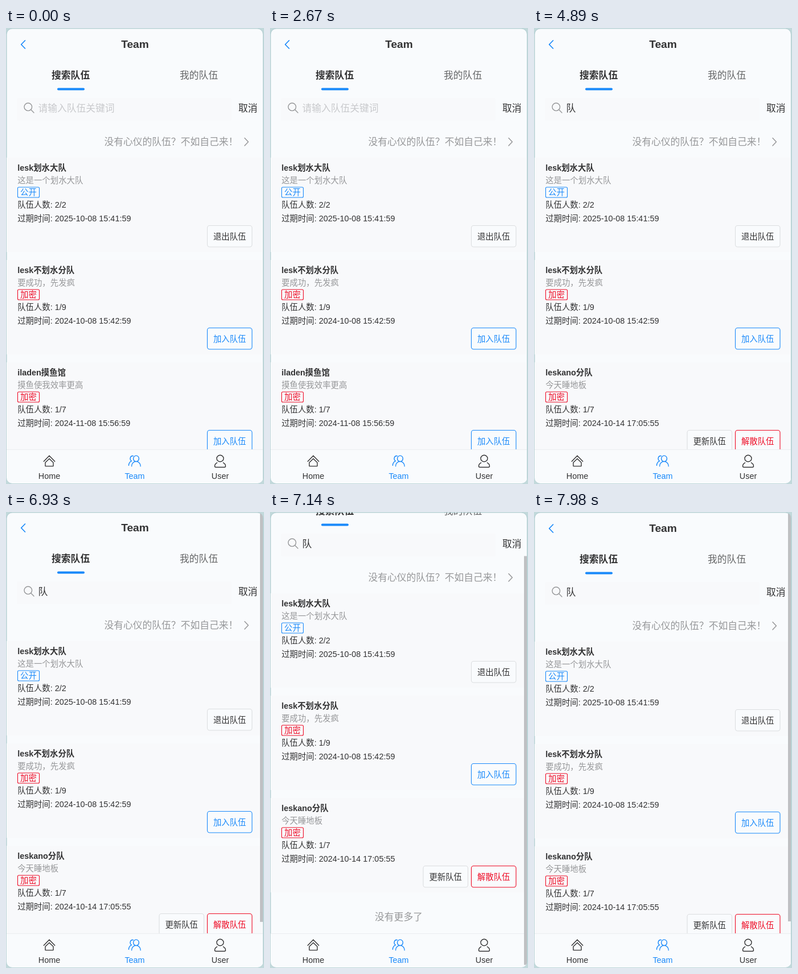
Recreate the animation shown at these times as an HTML page with a canvas. Size 453 by 802 pixels, loop 8 s.

```html
<!DOCTYPE html>
<html lang="zh-CN">
<head>
<meta charset="utf-8">
<title>Team</title>
<style>
html, body { margin: 0; width: 100%; height: 100%; overflow: hidden; background: #c2d9db; }
canvas { display: block; width: 453px; height: 802px; }
</style>
</head>
<body>
<canvas id="stage" lang="zh-CN"></canvas>
<script>
const W = 453, H = 802, LOOP = 8000, STEP = 30, MAX_SCROLL = 86;
const BLUE = '#1989fa', RED = '#ee0a24', DARK = '#323233', GREY = '#969799';
const PAGE = '#f9fbfd', PANEL = '#f8f9fb', LINE = '#dcdee0';
const FAMILY = '"Liberation Sans", "Noto Sans CJK SC", "Noto Sans CJK", sans-serif';

const canvas = document.getElementById('stage');
const dpr = window.devicePixelRatio || 1;
canvas.width = W * dpr;
canvas.height = H * dpr;
const ctx = canvas.getContext('2d');
ctx.lineCap = ctx.lineJoin = 'round';

const join = [['加入队伍', BLUE]];
const teams = [
  { name: 'lesk划水大队', about: '这是一个划水大队', open: true, count: '2/2',
    until: '2025-10-08 15:41:59', buttons: [['退出队伍', DARK]] },
  { name: 'lesk不划水分队', about: '要成功，先发疯', count: '1/9',
    until: '2024-10-08 15:42:59', buttons: join }
];
const allTeams = [...teams, { name: 'iladen摸鱼馆', about: '摸鱼使我效率更高', count: '1/7',
  until: '2024-11-08 15:56:59', buttons: join }];
const foundTeams = [...teams, { name: 'leskano分队', about: '今天睡地板', count: '1/7',
  until: '2024-10-14 17:05:55', buttons: [['解散队伍', RED], ['更新队伍', DARK]] }];

function text(str, x, y, size, color, bold, align = 'left') {
  ctx.font = `${bold ? 'bold ' : ''}${size}px ${FAMILY}`;
  ctx.textAlign = align;
  ctx.fillStyle = color;
  ctx.fillText(str, x, y);
}

function rect(x, y, w, h, color) {
  ctx.fillStyle = color;
  ctx.fillRect(x, y, w, h);
}

function round(x, y, w, h, r, fill, stroke) {
  ctx.beginPath();
  ctx.roundRect(x, y, w, h, r);
  if (fill) { ctx.fillStyle = fill; ctx.fill(); }
  if (stroke) { ctx.strokeStyle = stroke; ctx.lineWidth = 1.1; ctx.stroke(); }
}

function stroke(d, color, width) {
  ctx.strokeStyle = color;
  ctx.lineWidth = width;
  ctx.stroke(new Path2D(d));
}

// Standard ease-in-out, cubic-bezier(.42, 0, .58, 1)
function ease(p) {
  if (p <= 0) return 0;
  if (p >= 1) return 1;
  let lo = 0, hi = 1;
  for (let i = 0; i < 24; i++) {
    const s = (lo + hi) / 2, q = 1 - s;
    const x = 1.26 * q * q * s + 1.74 * q * s * s + s * s * s;
    if (x < p) lo = s; else hi = s;
  }
  return lo * lo * (3 - 2 * lo);
}

function scrollAt(t) {
  const down = ease((t - 6908) / 255), up = ease((t - 7422) / 268);
  return Math.round(MAX_SCROLL * (down - up));
}

function typedAt(t) {
  if (t < 3090) return '';
  if (t < 3210) return 'd';
  if (t < 3510) return 'du';
  return t < 4260 ? 'dui' : '队';
}

function caretAt(t) {
  return (t >= 1200 && t < 1710) || (t >= 2190 && t < 2670) || (t >= 3090 && t < 4740);
}

function drawHeader() {
  stroke('M33.5 22 L26.7 29 L33.5 36', BLUE, 1.7);
  text('Team', 226.5, 35, 19.2, DARK, true, 'center');
  text('搜索队伍', 113.6, 88.6, 16.8, DARK, true, 'center');
  text('我的队伍', 338.6, 88.6, 16.8, '#646566', false, 'center');
  round(90, 105.6, 48, 3.8, 1.9, BLUE);
}

function drawSearch(t) {
  round(19, 123, 377, 40, 2, PANEL);
  stroke('M45.6 138.8 a6.8 6.8 0 1 1 -13.6 0 a6.8 6.8 0 1 1 13.6 0 M43.8 143.8 L49 149', GREY, 1.4);
  const typed = typedAt(t);
  if (typed) text(typed, 56.4, 147.4, 16.8, DARK);
  else text('请输入队伍关键词', 56.4, 147.4, 16.8, '#c8c9cc');
  const width = typed ? ctx.measureText(typed).width : 0;
  if (typed && t < 4260) rect(56.4, 150, width, 1, DARK);
  if (caretAt(t)) rect(Math.round(56.4 + width), 131, 1, 20, DARK);
  text('取消', 408, 147.4, 16.8, DARK);
}

function drawInvite() {
  text('没有心仪的队伍？不如自己来！', 172.4, 206.4, 16.8, GREY);
  stroke('M419 193.5 L425.4 200.3 L419 207', GREY, 1.5);
}

function drawCard(team, y) {
  rect(1, y, 450, 166, PANEL);
  text(team.name, 20.2, y + 23, 14.4, DARK, true);
  text(team.about, 20.2, y + 45.4, 14.4, GREY);
  const hue = team.open ? BLUE : RED;
  round(20.5, y + 52, 38, 18, 2, PAGE, hue);
  text(team.open ? '公开' : '加密', 25, y + 66.4, 14.4, hue);
  text('队伍人数: ' + team.count, 20.2, y + 88.2, 14.4, DARK);
  text('过期时间: ' + team.until, 20.2, y + 112, 14.4, DARK);
  team.buttons.forEach(([label, color], i) => {
    const x = 353.5 - i * 84.5;
    round(x, y + 119.5, 78.5, 37.5, 4, PAGE, color === DARK ? LINE : color);
    text(label, x + 39.2, y + 143.8, 14.4, color, false, 'center');
  });
}

function drawList(t) {
  if (t >= 4740 && t < 4890) return;
  const list = t < 4740 ? allTeams : foundTeams;
  list.forEach((team, i) => drawCard(team, 228 + i * 180));
  if (list === foundTeams) text('没有更多了', 226, 803.3, 16.8, GREY, false, 'center');
}

function drawTabbar() {
  rect(1, 741, 450, 60, PAGE);
  rect(1, 741, 450, 1, '#ebedf0');
  stroke('M66.3 762.3 L76 752.3 L85.7 762.3 M69 770.6 V764.2 L76 757.6 L83 764.2 V770.6 Z', DARK, 1.4);
  stroke('M233.4 757.3 a4.9 5.2 0 1 1 -9.8 0 a4.9 5.2 0 1 1 9.8 0 ' +
    'M220.6 770.8 C220.8 759.6 236 759.6 236.2 770.8 ' +
    'M223.4 752.6 C217.6 751.6 216.6 759 220.4 761.6 C217 763 215.6 765.6 215.4 769.4', BLUE, 1.4);
  stroke('M382 757 a6 5.8 0 1 1 -12 0 a6 5.8 0 1 1 12 0 ' +
    'M370.6 764.6 C367.6 766 366.5 768 366.5 770.6 Q366.5 772.5 368.5 772.5 ' +
    'H383.5 Q385.5 772.5 385.5 770.6 C385.5 768 384.4 766 381.4 764.6', DARK, 1.4);
  text('Home', 76, 793, 14.4, DARK, false, 'center');
  text('Team', 226, 793, 14.4, BLUE, false, 'center');
  text('User', 376, 793, 14.4, DARK, false, 'center');
}

function draw(time) {
  const t = Math.floor(time / STEP) * STEP;
  const scroll = scrollAt(t);
  ctx.setTransform(dpr, 0, 0, dpr, 0, 0);
  rect(0, 0, W, H, '#c2d9db');
  round(1, 1, 450.5, 800, 10, PAGE, '#b5cfd3');
  ctx.save();
  ctx.clip();

  ctx.save();
  ctx.translate(0, -scroll);
  drawHeader();
  drawSearch(t);
  drawInvite();
  drawList(t);
  ctx.restore();

  drawTabbar();
  if (t >= 6930) rect(446, 1 + scroll * 0.9, 5, 719, '#bfc0c3');
  ctx.restore();
}

function tick() {
  draw(performance.now() % LOOP);
  requestAnimationFrame(tick);
}
tick();
</script>
</body>
</html>
```
